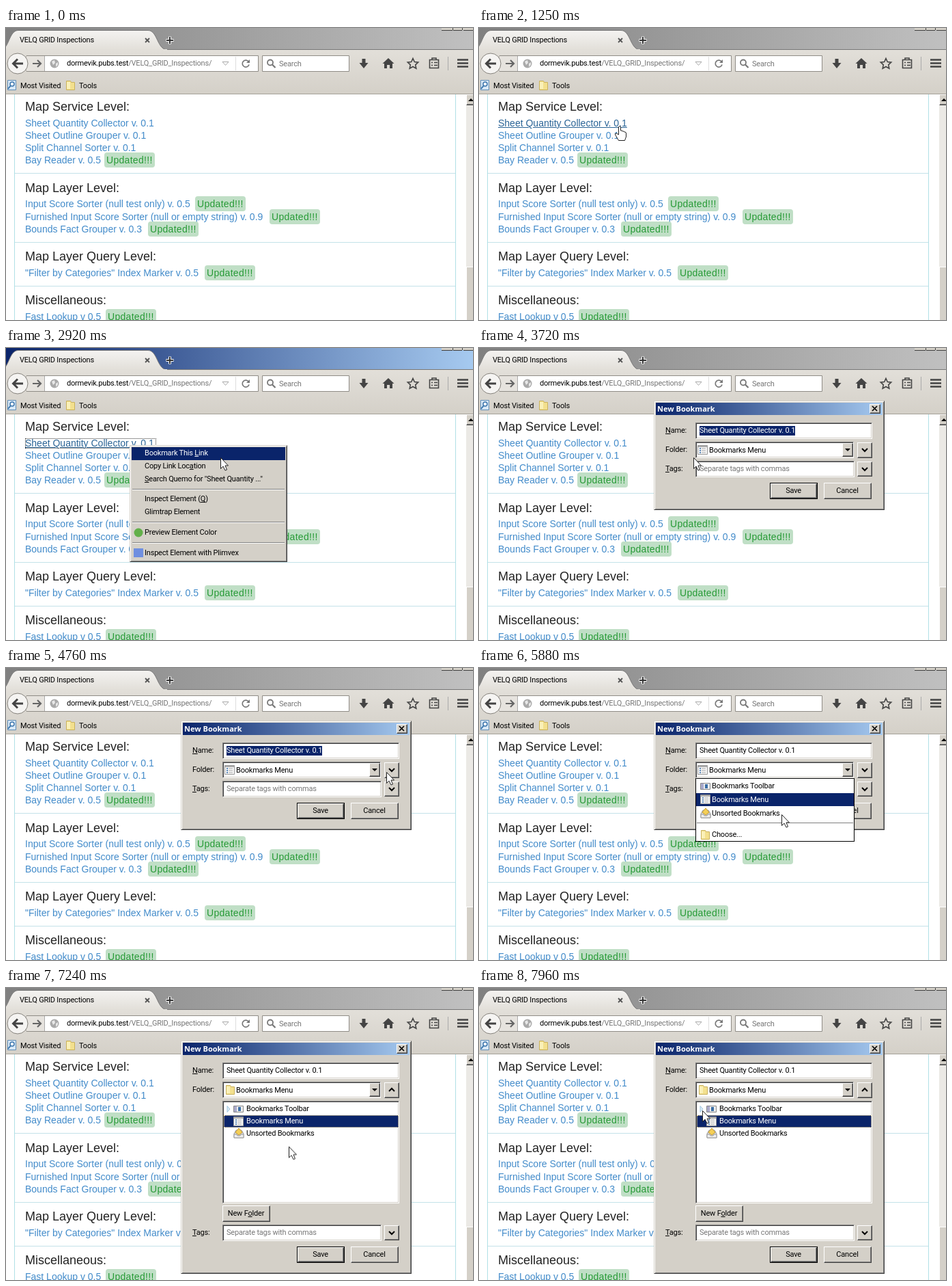
An HTML page that plays this animation: 684 px wide and 427 px high, repeating every 8 s.

```html
<!DOCTYPE html>
<html lang="en">
<head>
<meta charset="utf-8">
<title>Bookmarking a link</title>
<style>
html, body { margin: 0; width: 100%; height: 100%; overflow: hidden; background: #fff; }
#stage { position: absolute; left: 0; top: 0; width: 684px; height: 427px; overflow: hidden; }
div, p, svg { position: absolute; margin: 0; box-sizing: border-box; white-space: pre; }
.layer, .layer > svg { left: 0; top: 0; width: 684px; height: 427px; }
p { font: 11px/14px Roboto, sans-serif; letter-spacing: -.2px; color: #000; }
u { text-underline-offset: 1px; text-decoration-thickness: 1px; }

/* page */
.page p { font: 14px/20px "Liberation Sans", Arial, sans-serif; letter-spacing: 0; color: #428bca; left: 28px; }
.page p.h { font-size: 18px; color: #222; }
.page p.new { height: 22px; width: 74px; padding: 1px 0 0 3px; border-radius: 4px; background: #c0dfc6; color: #269a36; letter-spacing: .3px; }
.page hr { position: absolute; left: 13px; width: 645px; height: 1px; margin: 0; border: 0; background: #c4e2e9; }
.edge { top: 97px; width: 1px; height: 330px; background: #b0e0e6; }

/* classic controls */
.win, .btn { background: #d4d0c8; border: 1px solid; }
.win { border-color: #d4d0c8 #404040 #404040 #d4d0c8; box-shadow: inset 1px 1px #fff, inset -1px -1px #808080; }
.btn { border-color: #fff #404040 #404040 #fff; box-shadow: inset -1px -1px #808080; }
.main { box-shadow: inset -1px -1px #808080, 0 0 0 1px #000; }
.field { background: #fff; border: 1px solid; border-color: #808080 #fff #fff #808080; box-shadow: inset 1px 1px #404040, inset -1px -1px #d4d0c8; }
.sep { height: 2px; background: #808080; border-bottom: 1px solid #fff; }
.hi { background: #0a246a; }
.w { color: #fff; }
.hint { color: #777; }

/* states */
.on, .cap, .cursor, .hand, .arrow, .hover, .focus, .menu, .first, .dialog, .list, .chosen, .picked, .tree,
.listIcon, .down, .plain, .grow, .foot, .name, .r1, .r2, .r3 { animation: 8s step-end infinite; }
.cap { animation-name: cap; }
.hover { animation-name: hover; }
.focus { animation-name: focus; border: 1px dotted #333; }
.menu { animation-name: menu; }
.first { animation-name: first; }
.dialog { animation-name: dialog; }
.name { animation-name: name; }
.list { animation-name: list; }
.r1 { animation-name: r1; }
.r2 { animation-name: r2; }
.r3 { animation-name: r3; }
.listIcon { animation-name: before; }
.chosen { animation-name: after; }
.picked { animation-name: picked; }
.down { animation-name: folded; }
.tree { animation-name: unfolded; }
.grow { animation-name: grow; }
.foot { animation-name: foot; }
.cursor { animation-name: path; width: 1px; height: 1px; left: 0; top: 0; }
.cursor svg { overflow: visible; left: 0; top: 0; width: 1px; height: 1px; }
.hand { animation-name: hand; }
.arrow { animation-name: arrow; }

@keyframes cap { 0% { opacity: 0 } 22.625% { opacity: 1 } 46.5%, 100% { opacity: 0 } }
@keyframes hover { 0% { color: #428bca; text-decoration: none } 12.625% { color: #2a6496; text-decoration: underline } 46.5%, 100% { color: #428bca; text-decoration: none } }
@keyframes focus { 0% { opacity: 0 } 22.625% { opacity: 1 } 46.5%, 100% { opacity: 0 } }
@keyframes menu { 0% { opacity: 0 } 24.5% { opacity: 1 } 45.5%, 100% { opacity: 0 } }
@keyframes first { 0% { background: #d4d0c8; color: #000 } 29.5%, 100% { background: #0a246a; color: #fff } }
@keyframes dialog { 0% { opacity: 0 } 46.5%, 100% { opacity: 1 } }
@keyframes name { 0% { background: #0a246a; color: #fff } 68.5%, 100% { background: #fff; color: #000 } }
@keyframes list { 0% { opacity: 0 } 68.5% { opacity: 1 } 82.5%, 100% { opacity: 0 } }
@keyframes r1 { 0% { background: #0a246a; color: #fff } 74.5%, 100% { background: #fff; color: #000 } }
@keyframes r2 { 0% { background: #fff; color: #000 } 74.5% { background: #0a246a; color: #fff } 77.5%, 100% { background: #fff; color: #000 } }
@keyframes r3 { 0% { background: #fff; color: #000 } 77.5%, 100% { background: #0a246a; color: #fff } }
@keyframes before { 0% { opacity: 1 } 82.5%, 100% { opacity: 0 } }
@keyframes after { 0% { opacity: 0 } 82.5%, 100% { opacity: 1 } }
@keyframes picked { 0% { background: #fff; color: #000 } 82.5% { background: #0a246a; color: #fff } 83.5%, 100% { background: #fff; color: #000 } }
@keyframes folded { 0% { opacity: 1 } 83.5%, 100% { opacity: 0 } }
@keyframes unfolded { 0% { opacity: 0 } 83.5%, 100% { opacity: 1 } }
@keyframes grow { 0% { height: 160px } 83.5%, 100% { height: 341px } }
@keyframes foot { 0% { transform: none } 83.5%, 100% { transform: translateY(181px) } }
@keyframes hand { 0% { opacity: 0 } 12.625% { opacity: 1 } 24.5%, 100% { opacity: 0 } }
@keyframes arrow { 0% { opacity: 1 } 12.625% { opacity: 0 } 24.5%, 100% { opacity: 1 } }
@keyframes path {
  0% { opacity: 0; transform: translate(557px, 403px) }
  3.625% { opacity: 1; transform: translate(557px, 403px); animation-timing-function: steps(4) }
  7.625% { transform: translate(390px, 222px); animation-timing-function: steps(2) }
  9.625% { transform: translate(290px, 180px); animation-timing-function: steps(4) }
  13.625% { transform: translate(218px, 144px); animation-timing-function: steps(2) }
  15.625% { transform: translate(206px, 143px); animation-timing-function: steps(4) }
  19.625% { transform: translate(182px, 143px) }
  27.5% { transform: translate(182px, 143px); animation-timing-function: steps(9) }
  36.5% { transform: translate(314px, 160px) }
  52.5% { transform: translate(314px, 160px); animation-timing-function: steps(5) }
  57.5% { transform: translate(557px, 153px) }
  59.5% { transform: translate(557px, 152px) }
  60.5% { transform: translate(557px, 152px); animation-timing-function: steps(4) }
  64.5% { transform: translate(547px, 149px) }
  66.5% { transform: translate(545px, 148px) }
  68.5% { transform: translate(545px, 148px); animation-timing-function: steps(4) }
  72.5% { transform: translate(458px, 195px) }
  73.5% { transform: translate(443px, 214px); animation-timing-function: steps(4) }
  77.5% { transform: translate(428px, 240px) }
  89.5% { transform: translate(428px, 240px); animation-timing-function: steps(7) }
  96.5% { transform: translate(330px, 181px) }
  98.5% { transform: translate(328px, 180px) }
  99.5%, 100% { opacity: 1; transform: translate(327px, 179px) }
}
</style>
</head>
<body>
<div id="stage">

<svg width="0" height="0">
  <defs>
    <linearGradient id="tabFill" x2="0" y2="1"><stop stop-color="#f4f3f1"/><stop offset="1" stop-color="#e2dfd9"/></linearGradient>
    <linearGradient id="barFill" x2="0" y2="1"><stop stop-color="#e2dfd9"/><stop offset="1" stop-color="#d4d0c8"/></linearGradient>
    <g id="folder"><path d="M1.5 1.5h6l1 2h5v11h-12z" fill="#f3e08e" stroke="#c9b15c"/><path d="M2 3h5v10H2z" fill="#faf0b8"/></g>
    <g id="marks"><path d="M.5 1.5h14v13H.5z" fill="#f6f6f6" stroke="#999"/><path d="M1 2h13v2H1z" fill="#aaa"/><path d="M3 6h2M3 9h2M3 12h2" stroke="#5a87b8" stroke-width="2"/><path d="M6 6h6M6 9h6M6 12h6" stroke="#aaa"/></g>
    <g id="bar"><path d="M.5 3.5h14v9H.5z" fill="#eee" stroke="#888"/><path d="M1 4h4v8H1z" fill="#aac"/><path d="M7 5h4v6H7z" fill="#3a6ea5"/></g>
    <g id="tray"><path d="M1 8l3-5h8l3 5v6H1z" fill="#d9d9d9" stroke="#999"/><path d="M8 0l5 6-5 4-5-4z" fill="#f4cf57" stroke="#c99c2c"/><path d="M1 9h4l1 2h4l1-2h4v5H1z" fill="#eee" stroke="#999"/></g>
    <path id="vee" d="M-4-2L0 2 4-2" fill="none" stroke="#000" stroke-width="2"/>
  </defs>
</svg>

<!-- page -->
<div class="layer page">
  <div class="edge" style="left:12px"></div><div class="edge" style="left:658px"></div>
  <p class="h" style="top:105px">Map Service Level:</p>
  <p class="hover" style="top:129px">Sheet Quantity Collector v. 0.1</p>
  <div class="focus" style="left:28px;top:132px;width:192px;height:15px"></div>
  <p style="top:147px">Sheet Outline Grouper v. 0.1</p>
  <p style="top:165px">Split Channel Sorter v. 0.1</p>
  <p style="top:183px">Bay Reader v. 0.5</p><p class="new" style="left:144px;top:182px">Updated!!!</p>
  <hr style="top:212px">
  <p class="h" style="top:224px">Map Layer Level:</p>
  <p style="top:247px">Input Score Sorter (null test only) v. 0.5</p><p class="new" style="left:277px;top:246px">Updated!!!</p>
  <p style="top:266px">Furnished Input Score Sorter (null or empty string) v. 0.9</p><p class="new" style="left:386px;top:265px">Updated!!!</p>
  <p style="top:284px">Bounds Fact Grouper v. 0.3</p><p class="new" style="left:208px;top:283px">Updated!!!</p>
  <hr style="top:313px">
  <p class="h" style="top:324px">Map Layer Query Level:</p>
  <p style="top:348px">"Filter by Categories" Index Marker v. 0.5</p><p class="new" style="left:291px;top:347px">Updated!!!</p>
  <hr style="top:377px">
  <p class="h" style="top:388px">Miscellaneous:</p>
  <p style="top:412px">Fast Lookup v 0.5</p><p class="new" style="left:146px;top:411px">Updated!!!</p>
  <div style="left:674px;top:97px;width:16px;height:330px;background:#ebe9e5"></div>
  <div class="btn" style="left:674px;top:97px;width:16px;height:16px"></div>
  <div class="btn" style="left:674px;top:349px;width:16px;height:90px"></div>
  <svg><path d="M677 107l4-4 4 4z"/></svg>
</div>

<!-- browser -->
<div class="layer">
  <div style="left:0;top:0;width:684px;height:32px;background:linear-gradient(90deg,#808080,#c0c0c0)"></div>
  <div class="cap" style="left:0;top:0;width:684px;height:32px;background:linear-gradient(90deg,#0a246a,#a6caf0)"></div>
  <svg>
    <path d="M0 31.5H684" stroke="#777"/>
    <path d="M638 0h46v3h-46z" fill="#d4d0c8"/><path d="M638 3.5h16M655 3.5h13M670 3.5h14M654.5 0v3M668.5 0v3" stroke="#404040"/>
    <path d="M0 32H684V97H0z" fill="url(#barFill)"/>
    <path d="M-8 32C5 31 4 3.500 18 3.500H208C222 3.500 221 31 236 32z" fill="url(#tabFill)" stroke="#777"/>
    <path d="M-8 32H236" stroke="#e2dfd9" stroke-width="2"/>
    <path d="M204 15l6 6m0-6l-6 6" stroke="#555" stroke-width="1.800"/>
    <path d="M240 12.500v11M234.500 18h11" stroke="#fff" stroke-width="4"/><path d="M240 13v10M235 18h10" stroke="#333" stroke-width="2"/>
    <path d="M0 96.500H684" stroke="#a5a199"/>
    <path d="M30 40.500H369.500V63.500H30z" fill="#fff" stroke="#8f8c86"/>
    <path d="M30 41H56V63H30z" fill="#e6e3de"/><path d="M56.500 41V63" stroke="#aaa"/>
    <circle cx="17" cy="52" r="15" fill="#f5f4f2" stroke="#85827c"/>
    <path d="M25 52H11M17 45.500L10.500 52 17 58.500" fill="none" stroke="#444" stroke-width="3"/>
    <path d="M39 52H50M46 47l5 5-5 5" fill="none" stroke="#666" stroke-width="2.200"/>
    <circle cx="71" cy="52" r="6.500" fill="#aaa"/><path d="M67 49l4-2 1 4-3 3zM73 52l3-2v4l-3 3z" fill="#e8e8e8"/>
    <path d="M317 49.500h9l-4.500 5z" fill="#fff" stroke="#aaa"/><path d="M336.500 42v20" stroke="#ddd"/>
    <path d="M355.500 49.500a5 5 0 1 0 .5 4" fill="none" stroke="#777" stroke-width="1.700"/><path d="M357 46v5h-5z" fill="#777"/>
    <path d="M375.500 40.500H502.500V63.500H375.500z" fill="#fff" stroke="#8f8c86"/>
    <circle cx="387" cy="50.500" r="4" fill="none" stroke="#777" stroke-width="1.800"/><path d="M390 53.500l4.500 4.500" stroke="#777" stroke-width="2.200"/>
    <g fill="#444"><path d="M521.500 45h5v6h4l-6.500 8-6.500-8h4z"/><path d="M560 44l8.500 8h-2.500v7h-4v-5h-4v5h-4v-7h-2.500z"/></g>
    <path d="M596 44.500l2.300 5 5.400.6-4 3.700 1.100 5.400-4.800-2.700-4.800 2.700 1.100-5.400-4-3.700 5.400-.6z" fill="none" stroke="#444" stroke-width="1.600"/>
    <path d="M620.500 46.500h13v12h-13zM624 46v-2h6v2M623 50.500h2m2 0h5m-9 4h2m2 0h5" fill="none" stroke="#444" stroke-width="1.600"/>
    <path d="M647.500 42v20" stroke="#aaa"/>
    <path d="M661 46.500h16M661 51.500h16M661 56.500h16" stroke="#444" stroke-width="2.400"/>
    <path d="M2.500 76.500h12v14h-12z" fill="#d8e8f6" stroke="#5f8db8"/><circle cx="9" cy="82" r="3" fill="#fff" stroke="#3a75ad" stroke-width="1.500"/><path d="M7 84l-4 5" stroke="#3a75ad" stroke-width="2"/>
    <use href="#folder" x="87" y="76"/>
  </svg>
  <p style="left:20px;top:11px">VELQ GRID Inspections</p>
  <p style="left:89px;top:45px">dormevik.pubs.test<span class="hint">/VELQ_GRID_Inspections/</span></p>
  <p class="hint" style="left:400px;top:46px">Search</p>
  <p style="left:21px;top:78px">Most Visited</p>
  <p style="left:107px;top:78px">Tools</p>
</div>

<!-- context menu -->
<div class="layer menu">
  <div class="win" style="left:181px;top:142px;width:231px;height:171px"></div>
  <p class="first" style="left:184px;top:145px;width:225px;height:19px;padding:2px 0 0 19px">Bookmark This <u>L</u>ink</p>
  <p style="left:203px;top:166px">Copy Link Loc<u>a</u>tion</p>
  <p style="left:203px;top:185px"><u>S</u>earch Quemo for "Sheet Quantity ..."</p>
  <div class="sep" style="left:185px;top:206px;width:223px"></div>
  <p style="left:203px;top:214px">Inspect Element (<u>Q</u>)</p>
  <p style="left:203px;top:233px">Glimtrap Element</p>
  <div class="sep" style="left:185px;top:254px;width:223px"></div>
  <p style="left:203px;top:263px">Preview Element Color</p>
  <div class="sep" style="left:185px;top:284px;width:223px"></div>
  <p style="left:203px;top:293px">Inspect Element with Plimvex</p>
  <svg><circle cx="194" cy="270" r="6.500" fill="#62b04a"/><path d="M187 293h14v13h-14z" fill="#6f8fe0"/></svg>
</div>

<!-- bookmark dialog -->
<div class="layer dialog">
  <div class="win grow" style="left:256px;top:77px;width:338px"></div>
  <div style="left:259px;top:80px;width:332px;height:18px;background:linear-gradient(90deg,#0a246a,#a6caf0)"></div>
  <p class="w" style="left:261px;top:82px;font:bold 11px/14px 'Open Sans',sans-serif;letter-spacing:0">New Bookmark</p>
  <div class="btn" style="left:572px;top:82px;width:16px;height:14px"></div>

  <p style="left:273px;top:114px"><u>N</u>ame:</p>
  <div class="field" style="left:317px;top:109px;width:259px;height:24px"></div>
  <p class="name" style="left:323px;top:114px">Sheet Quantity Collector v. 0.1</p>

  <p style="left:273px;top:142px">Folder:</p>
  <div class="field" style="left:317px;top:137px;width:232px;height:24px"></div>
  <p class="picked" style="left:319px;top:139px;width:213px;height:20px;padding:4px 0 0 18px">Bookmarks Menu</p>
  <div class="btn" style="left:532px;top:139px;width:16px;height:20px"></div>
  <div class="btn" style="left:554px;top:138px;width:22px;height:23px"></div>
  <svg>
    <path d="M576 85l7 7m0-7l-7 7" stroke="#000" stroke-width="1.700"/>
    <path d="M536 147h8l-4 4z"/>
    <use class="listIcon" href="#marks" x="320" y="141"/>
    <use class="chosen" href="#folder" x="321" y="141"/>
    <use class="down" href="#vee" x="565" y="149"/>
    <use class="tree" href="#vee" transform="translate(565 149) scale(1 -1)"/>
  </svg>

  <div class="layer foot">
    <p style="left:273px;top:170px"><u>T</u>ags:</p>
    <div class="field" style="left:317px;top:165px;width:233px;height:24px"></div>
    <p class="hint" style="left:323px;top:170px">Separate tags with commas</p>
    <div class="btn" style="left:554px;top:166px;width:22px;height:22px"></div>
    <div class="btn main" style="left:427px;top:198px;width:68px;height:22px"></div>
    <p style="left:426px;top:202px;width:69px;text-align:center">Save</p>
    <div class="btn" style="left:505px;top:197px;width:70px;height:24px"></div>
    <p style="left:505px;top:202px;width:69px;text-align:center">Cancel</p>
    <svg><use href="#vee" x="565" y="177"/></svg>
  </div>

  <div class="layer tree">
    <div class="field" style="left:317px;top:165px;width:259px;height:150px"></div>
    <div class="hi" style="left:319px;top:186px;width:256px;height:18px;border:1px dotted #f5db95"></div>
    <p style="left:352px;top:170px">Bookmarks Toolbar</p>
    <p class="w" style="left:352px;top:188px">Bookmarks Menu</p>
    <p style="left:352px;top:206px">Unsorted Bookmarks</p>
    <div class="btn" style="left:317px;top:318px;width:70px;height:24px"></div>
    <p style="left:317px;top:323px;width:69px;text-align:center">New F<u>o</u>lder</p>
    <svg>
      <path d="M324 172.500l4 4.500-4 4.500z" fill="#dcecf8" stroke="#9cc3de"/>
      <use href="#bar" x="333" y="169"/><use href="#marks" x="333" y="187"/><use href="#tray" x="333" y="205"/>
    </svg>
  </div>

  <div class="layer list">
    <div style="left:317px;top:161px;width:233px;height:93px;background:#fff;border:1px solid #000"></div>
    <p style="left:341px;top:166px">Bookmarks Toolbar</p>
    <p class="r1" style="left:318px;top:183px;width:231px;height:19px;padding:3px 0 0 23px">Bookmarks Menu</p>
    <p class="r2" style="left:318px;top:203px;width:231px;height:20px;padding:3px 0 0 23px">Unsorted Bookmarks</p>
    <div style="left:319px;top:226px;width:229px;height:1px;background:#808080"></div>
    <p class="r3" style="left:318px;top:234px;width:231px;height:19px;padding:3px 0 0 23px">Choose...</p>
    <svg>
      <use href="#bar" x="324" y="165"/><use href="#marks" x="324" y="184"/>
      <use href="#tray" x="324" y="205"/><use href="#folder" x="324" y="236"/>
    </svg>
  </div>
</div>

<div class="cursor">
  <svg fill="#fff" stroke="#222">
    <path class="arrow" d="M.5.5V16.500L4 13 7 19 9.500 18 7 12H11.500z"/>
    <path class="hand" d="M-1.500 13V1.500Q0-.5 1.500 1.500V7L4 7.300 4.200 8 6.500 8.200 7 9 9 9.500 9.500 11V16L7.500 21.500H-1.500L-6.500 13Q-7 10.500-4.500 11z"/>
  </svg>
</div>

</div>
</body>
</html>
```
